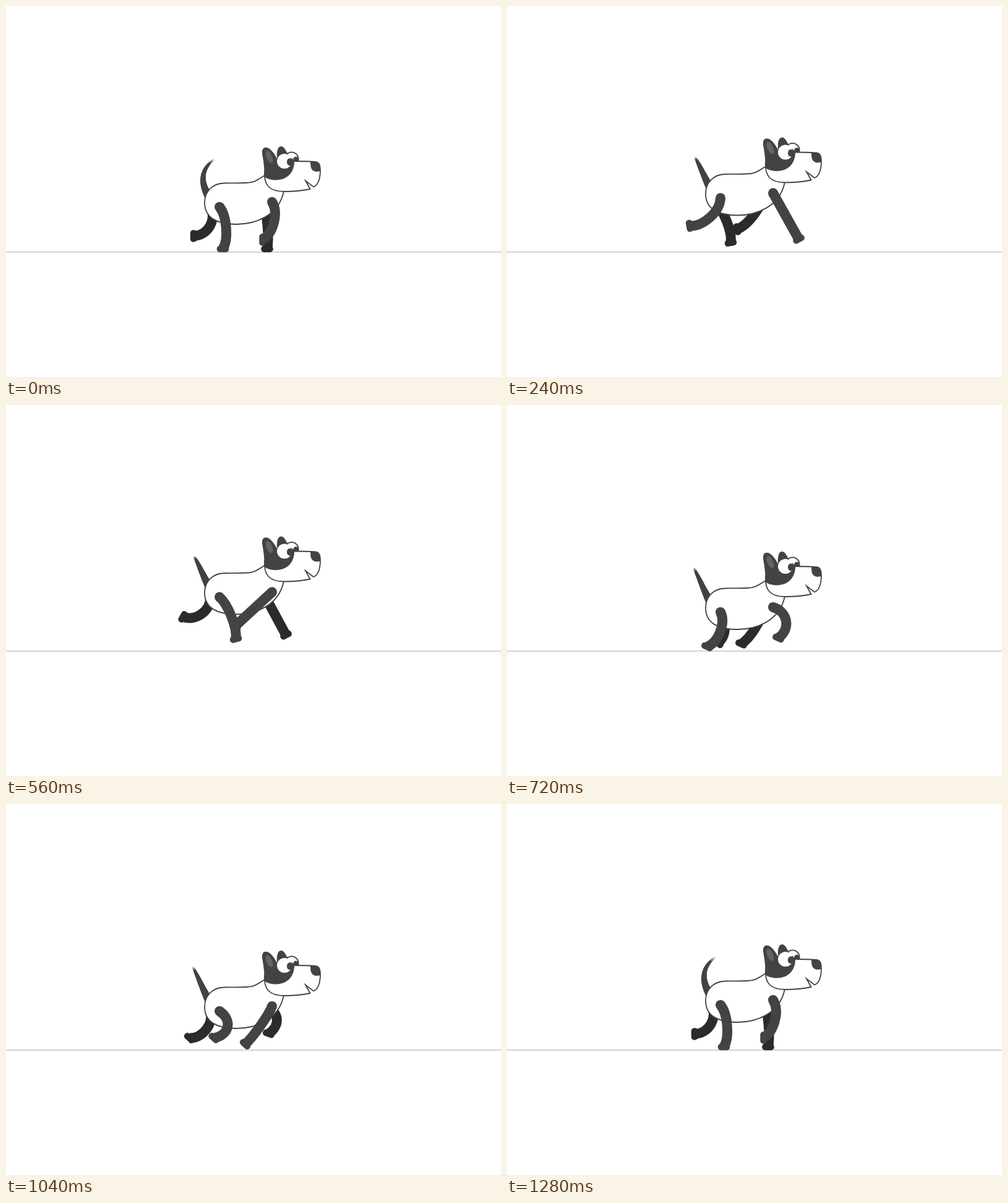
Write an HTML page with a canvas that moves like this. It is 800 px wide and 600 px high and loops after 1320 ms.

```html
<!DOCTYPE html>
<html lang="en">
<head>
<meta charset="utf-8">
<title>Running dog</title>
<style>
html, body { margin: 0; width: 100%; height: 100%; overflow: hidden; background: #fff; }
canvas { display: block; }
</style>
</head>
<body>
<canvas id="stage" width="800" height="600"></canvas>
<script>
const ctx = document.getElementById('stage').getContext('2d');
const LOOP = 1320, STRIDE = 640, STEP = 40;
const DARK = '#434343', FAR = '#2b2b2b';
const TIMES = [0, 80, 240, 320, 400, 560];

// Each pose: foot x, foot y, foot angle in degrees, bend of the leg
const legs = {
  farHind: { hip: [330, 325], color: FAR, poses: [
    [303, 372, 90, 15], [341, 385, 40, 16], [361.5, 383, -10, 8],
    [335.5, 393, 0, 7.5], [296.5, 378.5, 42, 13], [286, 342.5, 120, 14]] },
  farFront: { hip: [415, 317], color: FAR, poses: [
    [422, 393, 0, 4], [378.5, 386.5, 25, 6], [372, 361, 75, 8],
    [399.5, 378, 90, 11], [424.5, 371.5, 20, 18], [452.5, 372, -27, 0]] },
  nearHind: { hip: [345, 325], color: DARK, poses: [
    [350.5, 393, 0, 8], [323.5, 391, 25, 11], [295, 355.5, 80, 12],
    [318, 372, 90, 15], [336, 378.5, 42, 18], [371.5, 378.5, -15, 6.5]] },
  nearFront: { hip: [430, 317], color: DARK, poses: [
    [414.5, 378, 90, 11], [438.5, 377, 25, 17], [471.5, 377, -28, 0],
    [437, 393, 0, 4], [386.5, 388.5, 43, 3], [371, 357, 46, 0]] }
};

const shape = d => new Path2D(d);
const body = shape('M418 274C407 281 401 286 388 286C372 287 362 286 352 286.5C334 287 321 300 321 318C321 343 342 353 372 353C402 353 441 340 449 299');
const head = shape('M418 266C416 290 426 300 450 300C466 300 480 298.5 491.5 296L484 282.5L497 292.5C504 290 507.5 280 508 267C508 257 506 252.5 500 252Q485 251 464 251L440 245Z');
const patch = shape('M417.5 276C418 262 416 250 414 239C413 228 420 227 426 231C431 235 435 241 438 247Q450 236 462 246L466 251C466 268 456 281 436 281.5C428 281.5 421 279 417.5 276Z');
const farEar = shape('M438 246C437 236 439 227 444.5 227C449 227 452 233 456 241L450 248Z');
const nose = shape('M492 252L500 252C506 252.5 508 257 508 267C503 268.5 498 268 495 265C492 262 492 256 492 252Z');

// Smooth periodic interpolation through the poses
function poseAt(poses, t) {
  const n = TIMES.length;
  const time = i => TIMES[(i + n) % n] + STRIDE * Math.floor(i / n);
  const pose = i => poses[(i + n) % n];
  let i = n - 1;
  while (TIMES[i] > t) i--;
  const span = time(i + 1) - time(i), u = (t - time(i)) / span;
  return poses[0].map((_, k) => {
    const slope = j => (pose(j + 1)[k] - pose(j - 1)[k]) / (time(j + 1) - time(j - 1)) * span;
    const a = pose(i)[k], b = pose(i + 1)[k], m = slope(i), q = slope(i + 1);
    return a + u * (m + u * (3 * (b - a) - 2 * m - q + u * (2 * (a - b) + m + q)));
  });
}

function ellipse(x, y, rx, ry, color, angle = 0) {
  ctx.beginPath();
  ctx.ellipse(x, y, rx, ry, angle, 0, 2 * Math.PI);
  ctx.fillStyle = color;
  ctx.fill();
}

function outlined(path) {
  ctx.fillStyle = '#fff';
  ctx.strokeStyle = DARK;
  ctx.lineWidth = 1.8;
  ctx.fill(path);
  ctx.stroke(path);
}

function drawLeg({ hip, color, poses }, t, bob) {
  const [x, y, angle, bend] = poseAt(poses, t);
  const hx = hip[0], hy = hip[1] + bob;
  const dx = x - hx, dy = y - hy, h = bend * 4 / 3 / Math.hypot(dx, dy);
  const control = u => [hx + dx * u + dy * h, hy + dy * u - dx * h];
  ellipse(hx, hy, 8, 8, color);
  ctx.beginPath();
  ctx.moveTo(hx, hy);
  ctx.bezierCurveTo(...control(0.22), ...control(0.78), x, y);
  ctx.strokeStyle = color;
  ctx.lineWidth = 16;
  ctx.stroke();
  ctx.save();
  ctx.translate(x, y);
  ctx.rotate(angle * Math.PI / 180);
  ctx.beginPath();
  ctx.roundRect(-9.75, -5.25, 19.5, 10.5, 4.8);
  ctx.fill();
  ctx.restore();
}

function drawTail(w) {
  const c = Math.cos(w), s = Math.sin(w);
  const xs = [-10 - 2 * c, -18, -25.5 + 27.5 * c + 4 * c * c - s];
  const ys = [-18.5, -39 - 3 * c, -52.5 - 13.5 * c + 5 * c * c - 3 * s];
  const bezier = (p, u) => 3 * u * (1 - u) ** 2 * p[0] + 3 * u * u * (1 - u) * p[1] + u ** 3 * p[2];
  for (let i = 60; i >= 0; i--) {
    const u = i / 60, gray = 67 + 150 * Math.max(0, (u - 0.88) / 0.12);
    ellipse(329 + bezier(xs, u), 310 + bezier(ys, u), 6.7 - 4.9 * u, 6.7 - 4.9 * u, `rgb(${gray},${gray},${gray})`);
  }
}

function drawHead() {
  const farEye = new Path2D();
  farEye.arc(461.5, 247.5, 11.2, 0, 2 * Math.PI);
  outlined(farEye);
  ellipse(468.5, 249, 4.5, 5.5, DARK);
  ctx.fill(farEar);
  outlined(head);
  ctx.fillStyle = DARK;
  ctx.fill(patch);
  ctx.fill(nose);
  ellipse(425.5, 244, 4.8, 10.5, '#636363', -0.4);
  ellipse(450, 251, 12, 12, '#fff');
  ellipse(458.7, 252.3, 4.8, 6, DARK);
}

function draw(t) {
  const w = 4 * Math.PI * t / STRIDE;
  const bob = -2.25 + 12.25 * Math.sin(w) + 2.25 * Math.cos(w);
  const onBody = paint => {
    ctx.save();
    ctx.translate(0, bob);
    paint();
    ctx.restore();
  };
  ctx.fillStyle = '#fff';
  ctx.fillRect(0, 0, 800, 600);
  ctx.fillStyle = '#d3d3d3';
  ctx.fillRect(0, 397, 800, 2);
  onBody(() => drawTail(w));
  drawLeg(legs.farHind, t, bob);
  drawLeg(legs.farFront, t, bob);
  onBody(() => outlined(body));
  drawLeg(legs.nearFront, t, bob);
  drawLeg(legs.nearHind, t, bob);
  onBody(drawHead);
}

function tick() {
  const t = performance.now() % LOOP;
  draw(Math.floor(t / STEP) * STEP % STRIDE);
  requestAnimationFrame(tick);
}
tick();
</script>
</body>
</html>
```
